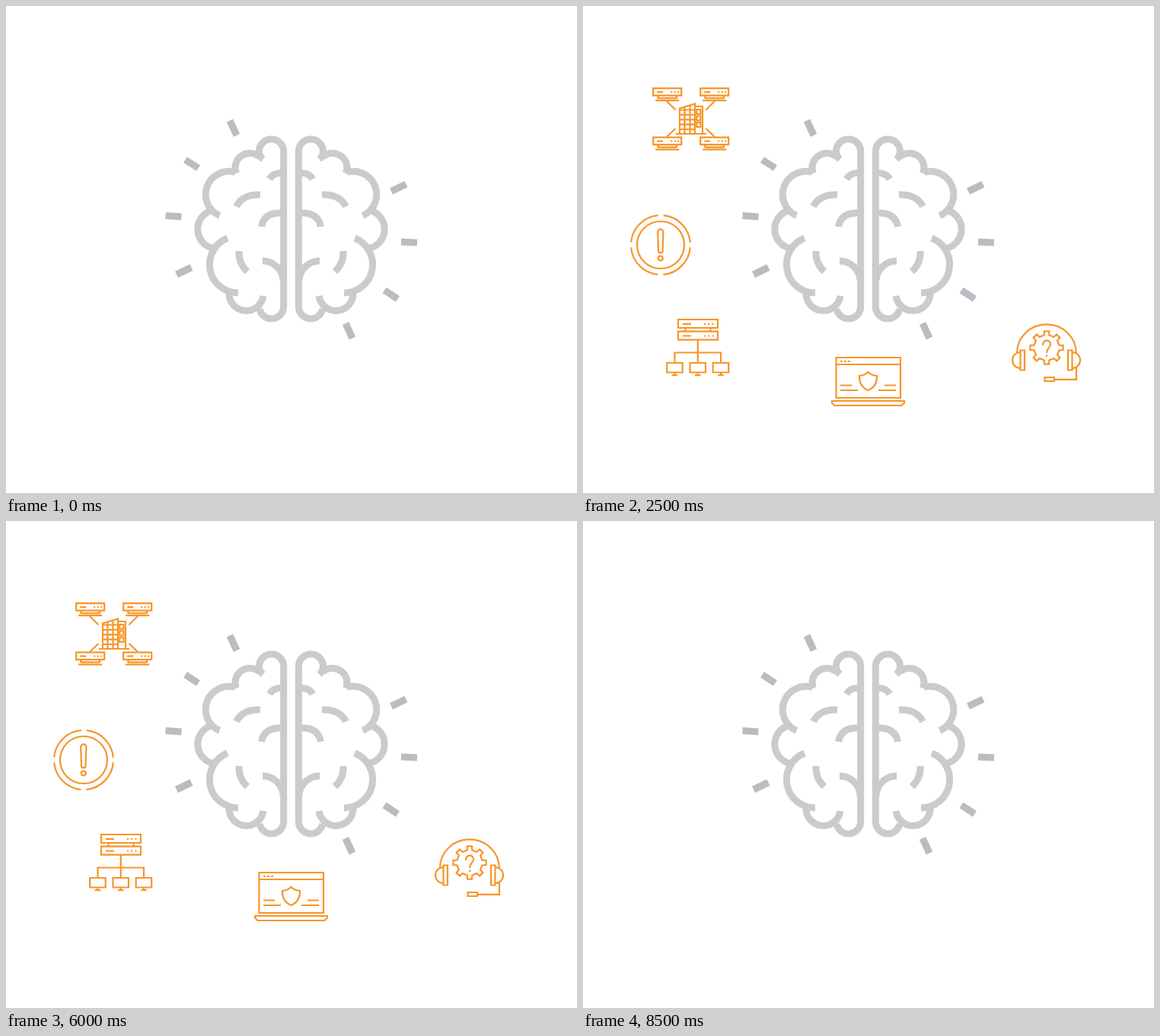
Write an HTML page that moves like this. It is 750 by 640 pixels and loops after 9000 ms.

```html
<!DOCTYPE html>
<html lang="en">
<head>
<meta charset="utf-8">
<title>Support topics</title>
<style>
  html, body { margin: 0; width: 100%; height: 100%; overflow: hidden; background: #fff; }
  svg { display: block; width: 750px; height: 640px; fill: none; }
  #icons { stroke: #f7952a; stroke-width: 2.2; }
  #icons > g { visibility: hidden; }
</style>
</head>
<body>
<svg viewBox="0 0 750 640">
  <defs>
    <g id="half">
      <path d="M333 398A16 16 0 0 0 364.7 394.5V191A16.1 16 0 0 0 332.5 191Q332.5 197 337.5 201.5"/>
      <path d="M333 198.5A19.1 19.1 0 0 0 302.5 220"/>
      <path d="M301 218.5A30.35 30.35 0 0 0 280.5 275.5"/>
      <path d="M269 269A25.8 25.8 0 0 0 272 318.5"/>
      <path d="M291 305A37.3 37.3 0 0 0 305 377"/>
      <path d="M293 377A22.62 22.62 0 0 0 338 381"/>
      <path d="M346 227.5Q351 219 362 219.5M302.5 263.5Q311 247 334 248M335.5 290Q339 271.5 361 272"/>
      <path d="M306 322Q305 338 317 349M337 335A27 27 0 0 1 364 361"/>
    </g>
    <g id="monitor">
      <path d="M0 0H20.5V12.5H0ZM10.2 12.5V16M6.5 16.2H14"/>
    </g>
    <g id="rack">
      <path d="M0 0H52V11H0ZM6 5.8H17M34 5.8H36M39 5.8H41M44.5 5.8H46.5"/>
    </g>
    <g id="server">
      <path d="M0 0H37V9.5H0ZM5 5H13M23 5H25M27.5 5H29.5M32 5H34M7 9.5L5.5 13.5M30 9.5L31.5 13.5M3 16H34M6 13H31"/>
    </g>
    <path id="window" d="M0 0H5V6H0Z"/>
  </defs>

  <g stroke="#cbcbcb" stroke-width="9">
    <use href="#half"/>
    <use href="#half" transform="translate(749) scale(-1 1)"/>
  </g>
  <path stroke="#bcbbc1" stroke-width="9.2" d="M294 150.500L303 170M235.500 202L252.500 213M209.500 275.500L230.500 277M224 353L243.500 343.500M506 243.500L525.500 234.200M519 310L540 311M497 373.500L514.500 385M446 417L455 436.500"/>

  <g id="icons">
    <g><!-- headset -->
      <path d="M570 456A38.8 37.5 0 0 1 647.8 456M574.5 452.5H580V478.5H574.5ZM637 452.5H642.5V478.5H637Z"/>
      <path d="M574.5 455A10.5 10.5 0 0 0 574.5 476M642.5 455A10.5 10.5 0 0 1 642.5 476M648 475V490.8H619M606.5 488H619V493H606.5Z"/>
      <path id="gear"/>
      <path d="M604 446C603 438 614.5 437.5 614 445C613.5 449.5 609 449.5 609 456M609 458.5V461"/>
    </g>
    <g><!-- laptop -->
      <path d="M332.5 462H417V515H332.5ZM332.5 471H417M338 467H341M343 467H346M348 467H351"/>
      <path d="M327 519H422V521.5L418.5 525H330.5L327 521.5ZM338 498.5H353M338 505H361M396 498.5H411M388 505H411"/>
      <path d="M374.5 481Q379 485.5 386 486Q386.5 500 374.5 505Q362.5 500 363 486Q370 485.5 374.5 481Z"/>
    </g>
    <g><!-- network -->
      <use href="#rack" x="125" y="412"/>
      <use href="#rack" x="125" y="427.7"/>
      <path d="M134.5 423V428M167.5 423V428M150.8 439V468M120.5 468V455.5H181V468"/>
      <use href="#monitor" x="110.2" y="469"/>
      <use href="#monitor" x="140.5" y="469"/>
      <use href="#monitor" x="170.7" y="469"/>
    </g>
    <g><!-- alert -->
      <circle cx="102" cy="314" r="39" stroke-dasharray="54.26 7" stroke-dashoffset="-3.5"/>
      <circle cx="102" cy="314" r="31"/>
      <path d="M98.2 297A3.6 3.6 0 0 1 105.4 297L104.6 321.5A2.8 2.8 0 0 1 99 321.5Z"/>
      <circle cx="101.8" cy="331.5" r="3"/>
    </g>
    <g><!-- data centre -->
      <use href="#server" x="92.2" y="108.2"/>
      <use href="#server" x="154.2" y="108.2"/>
      <use href="#server" x="92.2" y="172.7"/>
      <use href="#server" x="154.2" y="172.7"/>
      <path d="M110 125L121.5 136.5M173 125L161.5 136.5M121.5 161L110 172M161.5 161L173 172"/>
      <path d="M127 168V134.5L147 128.5V168M147 132H157V168M122 168H162M133.5 133V168M140.5 131V168M127 136.5H147M127 143H147M127 149.3H147M127 155.6H147M127 162H147"/>
      <use href="#window" x="149.3" y="136"/>
      <use href="#window" x="149.3" y="144.5"/>
      <use href="#window" x="149.3" y="153"/>
    </g>
    <g><!-- cloud -->
      <path d="M348 112.5H340A13.2 13.2 0 0 1 343 86.5A13 13 0 0 1 364.5 77.5A17.5 17.5 0 0 1 399 81A16.6 16.6 0 1 1 407 112.5H401M374 72Q383.5 65.5 391.5 75.5"/>
      <path d="M351 112.5H353.5M355.5 112.5H358M392.5 112.5H395M396.5 112.5H399"/>
      <path d="M365.8 96.5L374 104.5H370.2V133H361.3V104.5H357.5ZM379.5 96.5H388.5V124.5H392.5L384.2 132.8L376 124.5H379.5Z"/>
    </g>
    <g><!-- chat -->
      <path d="M545 115H607Q611 115 611 119V154Q611 158 607 158H564.5L553 168V158H545Q541 158 541 154V119Q541 115 545 115Z"/>
      <path d="M611 127.5H632Q636 127.5 636 131.5V166Q636 170 632 170H626V181L614 170.3H571Q567 170.3 567 166V158"/>
      <path d="M551 127H602M551 137.5H602M551 148H588M615 139H630.5M615 149H630.5M619 159H630.5"/>
    </g>
    <g><!-- checklist -->
      <path d="M634 256H613Q609 256 609 260V341Q609 345 613 345H679Q683 345 683 341V260Q683 256 679 256H658M634 249H658V263H634Z"/>
      <path d="M619 282L623 286L630 278M619 304L623 308L630 300M619 326L623 330L630 322M638 282H673M638 304H673M638 326H673"/>
    </g>
  </g>
</svg>
<script>
  const STEP = 500, LOOP = 9000;
  const icons = document.querySelectorAll('#icons > g');

  function gearPath(cx, cy, inner, outer, teeth) {
    const points = [];
    for (let i = 0; i < teeth; i++) {
      const middle = i * 2 * Math.PI / teeth - Math.PI / 2;
      for (const [r, offset] of [[inner, -.2], [outer, -.14], [outer, .14], [inner, .2]]) {
        const a = middle + offset;
        points.push((cx + r * Math.cos(a)).toFixed(1) + ' ' + (cy + r * Math.sin(a)).toFixed(1));
      }
    }
    return 'M' + points.join('L') + 'Z';
  }
  document.getElementById('gear').setAttribute('d', gearPath(609, 449, 16.8, 21.8, 8));

  // Icons appear one by one, then leave in reverse order.
  function draw(now) {
    const step = Math.floor(now % LOOP / STEP);
    const shown = Math.min(step, LOOP / STEP - 1 - step);
    icons.forEach((icon, i) => icon.style.visibility = i < shown ? 'visible' : 'hidden');
    requestAnimationFrame(() => draw(performance.now()));
  }
  draw(performance.now());
</script>
</body>
</html>
```
